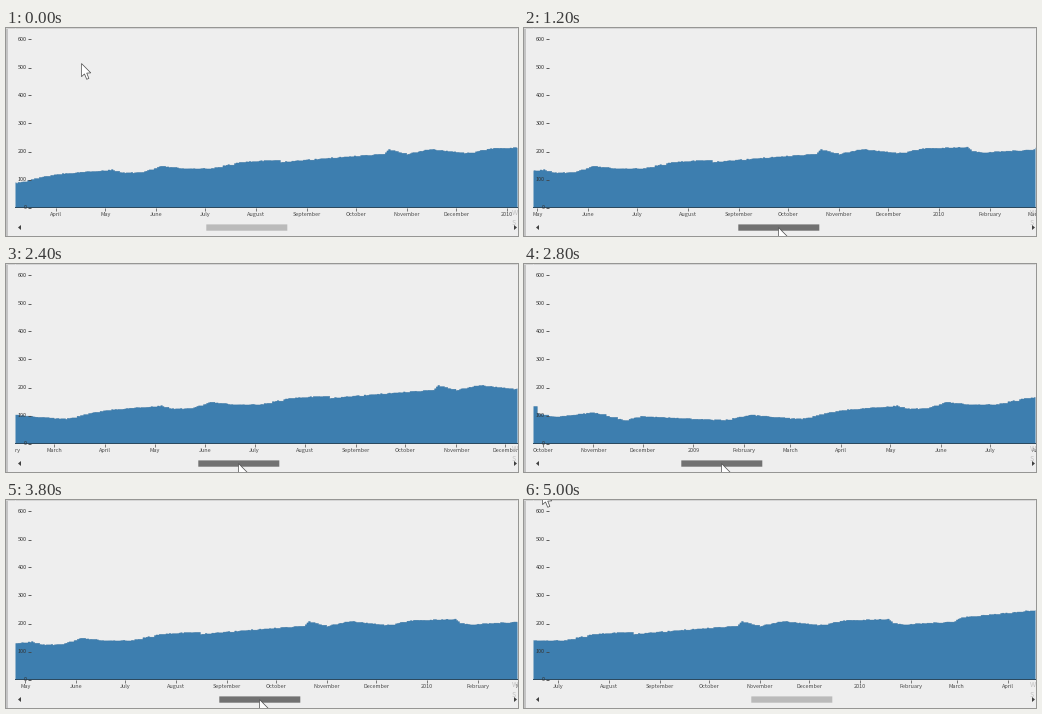
Write a matplotlib script that moves like this. It is 512x208 px and loops after 5.2 s.

```python
import numpy as np
import matplotlib.pyplot as plt
from matplotlib.animation import FuncAnimation
from matplotlib.patches import Polygon, Rectangle

W, H, DPI = 512, 208, 100
FRAMES, INTERVAL = 26, 200
LEFT, BASE = 9, 179
PX_PER_DAY, PX_PER_UNIT = 1.64, 0.28
SCROLL_RATIO = 6.2  # chart pixels per scrollbar pixel
THUMB_X, THUMB_W, GRIP = 200, 81, 40
PRESS, RELEASE = 5, 22
BACK, BLUE, EDGE, INK = "#eeeeee", "#3d7eaf", "#34709f", "#4a4a4a"
IDLE, HOVER, PRESSED = "#bababa", "#a8a8a8", "#717171"

MONTHS = ["January", "February", "March", "April", "May", "June", "July",
          "August", "September", "October", "November", "December"]

# (days since 1 April 2009, value) at the main turning points
TURNS = [
    (-206, 150), (-187, 130), (-185, 106), (-174, 92), (-150, 108),
    (-131, 80), (-121, 95), (-71, 80), (-54, 99), (-24, 84), (-6, 108),
    (5, 118), (35, 132), (42, 121), (53, 123), (65, 144), (83, 135),
    (97, 138), (114, 160), (136, 167), (138, 160), (167, 174), (201, 189),
    (204, 204), (215, 188), (229, 206), (251, 191), (266, 208), (293, 213),
    (296, 199), (303, 194), (333, 204), (338, 219), (384, 246), (389, 270)]

# (step, chart scroll in pixels) where the drag changes speed
DRAG = [(5, 0), (6, 86), (7, 186), (9, 191), (10, 148), (13, -148),
        (14, -267), (16, -290), (17, -125), (18, 10), (20, 150), (21, 165)]
APPROACH = [(75, 35), (240, 176)]
DEPART = [(38, 51), (21, 6), (18, -9)]


def daily_values():
    days = np.arange(-206, 420)
    values = np.interp(days, *zip(*TURNS))
    values += np.random.default_rng(4).uniform(-1.5, 1.5, len(days))
    weekday = (days + 2) % 7
    last_open = np.arange(len(days)) - np.maximum(weekday - 4, 0)
    return days, values[np.maximum(last_open, 0)]


def month_starts():
    epoch = np.datetime64("2009-04-01")
    for month in np.arange("2008-09", "2010-07", dtype="datetime64[M]"):
        number = int(month.astype(int)) % 12
        name = MONTHS[number] if number else str(month)[:4]
        yield int((month.astype("datetime64[D]") - epoch).astype(int)), name


def layer(x0, z):
    ax = fig.add_axes([x0 / W, 0, (W - x0) / W, 1], zorder=z)
    ax.set(xlim=(x0, W), ylim=(H, 0))
    ax.axis("off")
    return ax


def box(x, y, w, h, color, **kw):
    return front.add_patch(Rectangle((x, y), w, h, fc=color, lw=0, **kw))


def label(ax, x, y, s, ha="center", color=INK, size=5.5):
    ax.text(x, y, s, ha=ha, va="baseline", color=color, clip_on=True,
            family="Noto Sans CJK JP", fontsize=size * 72 / DPI)


def day_x(day):
    return 50 + PX_PER_DAY * np.asarray(day)


fig = plt.figure(figsize=(W / DPI, H / DPI), dpi=DPI, facecolor=BACK)
chart, front = layer(LEFT, 1), layer(0, 2)

# scrolling content, each bar centred on its day
days, values = daily_values()
chart.fill_between(day_x(days - 1.2), BASE + 0.5, BASE - PX_PER_UNIT * values,
                   step="post", fc=BLUE, ec=EDGE, lw=0.3)
for day, name in month_starts():
    x = float(day_x(day))
    chart.vlines(x, 180, 183, color=INK, lw=0.5)
    label(chart, x, 188, name)

# fixed frame, value axis and scrollbar
box(0, 0, 2, H, "#c4c4c4")
box(0, 0, W, 1, "#d5d5d5")
box(LEFT, 179, W - LEFT, 1, "#2c4a60")
for x in (LEFT, W - 1):
    box(x, 0, 1, BASE, BACK, alpha=0.5)
for value in range(0, 700, 100):
    y = BASE - PX_PER_UNIT * value
    label(front, 21, y + 2, str(value), ha="right", color="#333333")
    front.hlines(y + 0.5, 22, 25, color="#444444", lw=0.6)
for tip, back in ((12, 15), (511, 508)):
    front.add_patch(Polygon([(tip, 199.5), (back, 197), (back, 202)],
                            fc="#404040", lw=0))
for y, letter in ((187, "W"), (197, "S")):
    label(front, 506, y, letter, ha="left", color="#c2c2c2", size=7)
thumb = box(THUMB_X, 196.4, THUMB_W, 6.3, IDLE, snap=False)

ARROW = np.array([(0, 0), (0, 13.2), (3, 10.4), (5.2, 15.8), (7.4, 14.9),
                  (5.2, 9.6), (9.3, 9.4)]) + 0.5
cursor = front.add_patch(Polygon(ARROW, fc="white", ec="#4a4a4a", lw=0.5))


def pointer(i, thumb_x):
    if i < len(APPROACH):
        return APPROACH[i]
    if i > RELEASE:
        return DEPART[i - RELEASE - 1]
    return thumb_x + GRIP, 199


def update(i):
    scroll = np.interp(i, *zip(*DRAG))
    thumb_x = THUMB_X + round(scroll / SCROLL_RATIO)
    over = len(APPROACH) <= i <= RELEASE
    held = PRESS <= i < RELEASE
    chart.set_xlim(LEFT + scroll, W + scroll)
    thumb.set_x(thumb_x + 0.3)
    thumb.set_facecolor(PRESSED if held else HOVER if over else IDLE)
    cursor.set_xy(ARROW + pointer(i, thumb_x))
    return chart, thumb, cursor


anim = FuncAnimation(fig, update, frames=FRAMES, interval=INTERVAL,
                     repeat=True, repeat_delay=0, blit=False)
plt.show()
```
